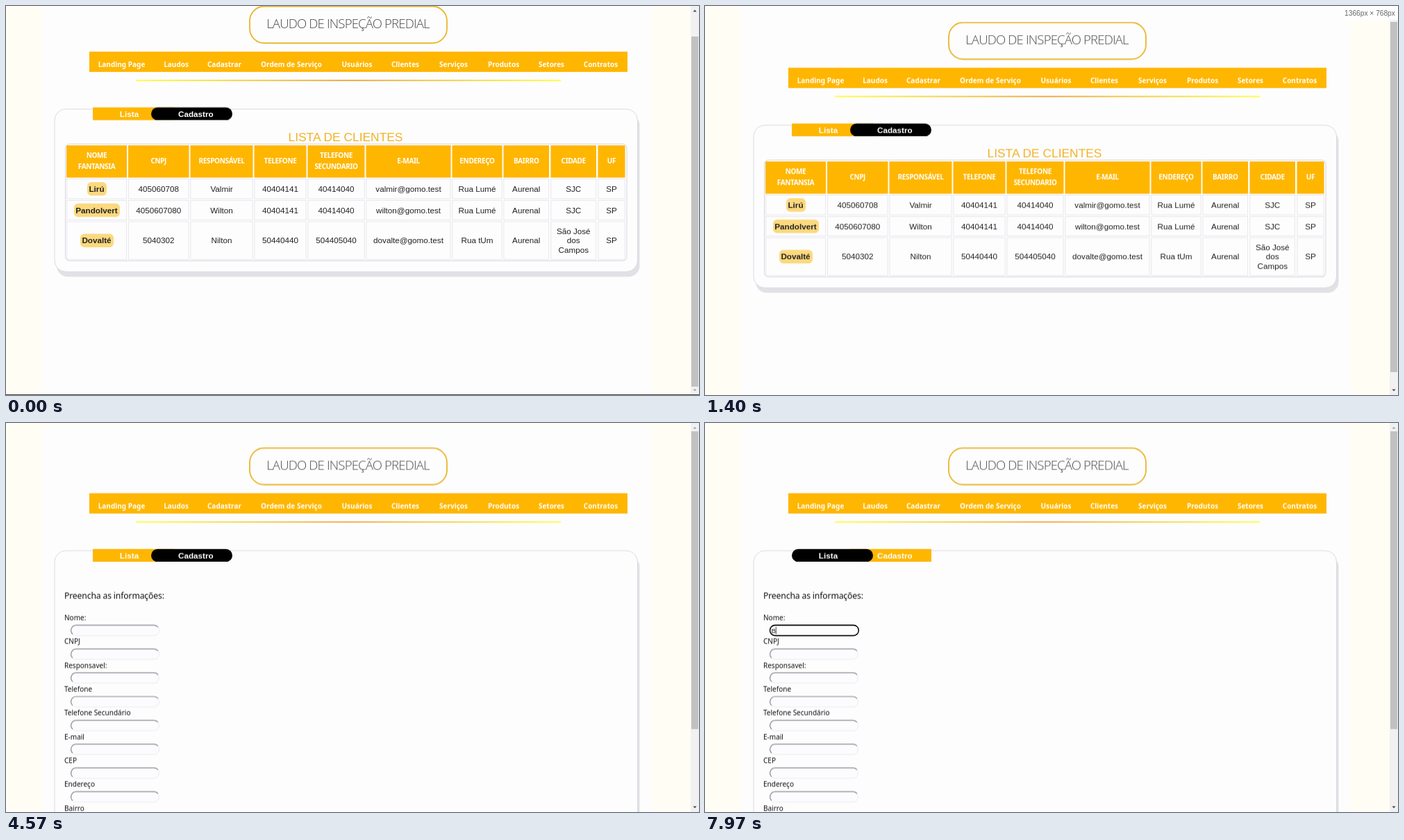
These frames come from a looping animation (998 by 561 pixels, 8000 ms). An HTML page:

```html
<!DOCTYPE html>
<html lang="pt">
<head>
<meta charset="utf-8">
<title>Lista de clientes</title>
<style>
  html, body { margin: 0; width: 100%; height: 100%; overflow: hidden; background: #fffdf4; }
  svg { display: block; width: 100%; height: 100%; }
  text { font: 11.7px "Liberation Sans", Arial, sans-serif; fill: #222; }
  .mid { text-anchor: middle; }
  .bold { font-weight: 700; }
  .white { fill: #fff; }
  .title { font: 300 18.6px "Open Sans", sans-serif; letter-spacing: -.85px; fill: #4c4c4c; }
  .nav { font: 600 10px "Noto Sans", sans-serif; fill: #fff; }
  .head { font: 600 10px "Noto Sans", sans-serif; letter-spacing: -.35px; fill: #fff; }
  .caption { font-size: 17.4px; fill: #f2b227; }
  .intro { font: 500 12.2px "Noto Sans", sans-serif; letter-spacing: -.15px; fill: #111; }
  .label { font: 500 10px "Noto Sans", sans-serif; fill: #111; }
  .typed { font-size: 9.8px; fill: #333; }
  .size { font-size: 10.2px; fill: #666; }
</style>
</head>
<body>
<svg id="stage" viewBox="0 0 998 561" preserveAspectRatio="none"></svg>
<script>
const LOOP = 8000;
const AMBER = '#ffb600', PAPER = '#fdfdfd', LINE = '#e3e3ec';
const stage = document.getElementById('stage');

function add(parent, tag, attrs = {}) {
  const el = document.createElementNS('http://www.w3.org/2000/svg', tag);
  for (const key in attrs) el.setAttribute(key, attrs[key]);
  parent.append(el);
  return el;
}
const group = parent => add(parent, 'g');
const rect = (parent, x, y, width, height, fill, more) =>
  add(parent, 'rect', { x, y, width, height, fill, ...more });
const path = (parent, d, fill, more) => add(parent, 'path', { d, fill, ...more });

// cy is the middle of the capital letters
function text(parent, str, x, cy, cls = 'mid') {
  const el = add(parent, 'text', { x, class: cls });
  el.textContent = str;
  el.setAttribute('y', cy + parseFloat(getComputedStyle(el).fontSize) * .36);
  return el;
}

// steps: [time in ms, value, easing]; values hold unless an easing is given
function play(el, prop, steps) {
  const frames = steps.map(([ms, value, easing = 'step-end']) =>
    ({ offset: ms / LOOP, [prop]: value, easing }));
  frames.push({ offset: 1, [prop]: steps[steps.length - 1][1] });
  el.animate(frames, { duration: LOOP, iterations: Infinity });
}
const show = (el, from, to = LOOP) => {
  const steps = from ? [[0, 0], [from, 1]] : [[0, 1]];
  if (to < LOOP) steps.push([to, 0]);
  play(el, 'opacity', steps);
};
const slide = (el, far, near) => play(el, 'transform', [
  [0, far], [1250, far, 'ease-out'], [1400, near], [1700, near, 'ease-out'], [1800, 0]
].map(([ms, y, easing]) => [ms, `translate(0px, ${y}px)`, easing]));

const FORM_AT = 4300, TAB_AT = 5100, FOCUS_AT = 5300, TYPE_AT = 7750;

// Page
const page = group(stage);
slide(page, -35.5, -12.3);
const listSheet = rect(page, 51, 5, 879, 586.5, PAPER);
const formSheet = rect(page, 51, 5, 879, 700, PAPER);
show(formSheet, FORM_AT);

rect(page, 351, 36, 284, 53, PAPER, { rx: 21, stroke: '#eab62f', 'stroke-width': 1.8 });
text(page, 'LAUDO DE INSPEÇÃO PREDIAL', 492.5, 61, 'mid title');

rect(page, 120, 101.3, 775, 29.3, AMBER);
[['Landing Page', 166.5], ['Laudos', 245], ['Cadastrar', 314.5], ['Ordem de Serviço', 411],
 ['Usuários', 505.5], ['Clientes', 575], ['Serviços', 644.5], ['Produtos', 716.5],
 ['Setores', 785.5], ['Contratos', 856.5]]
  .forEach(([name, x]) => text(page, name, x, 119.8, 'mid nav'));

const fade = add(add(page, 'defs'), 'linearGradient', { id: 'rule' });
[[0, '#ffff2a'], [.5, '#e99a2c'], [1, '#ffff2a']]
  .forEach(([offset, color]) => add(fade, 'stop', { offset, 'stop-color': color }));
rect(page, 187, 142, 612, 1.7, 'url(#rule)');

function panel(parent, height) {
  rect(parent, 73, 191.5, 839.5, height, '#e1e1e6', { rx: 16 });
  rect(parent, 70, 184.2, 839.5, height, PAPER, { rx: 16, stroke: '#d6d6e0', 'stroke-width': .9 });
}

// Client list
const list = group(page);
show(list, 0, FORM_AT);
panel(list, 234.5);
text(list, 'LISTA DE CLIENTES', 489, 224, 'mid caption');
rect(list, 85.5, 234.5, 808.5, 168.5, 'none', { rx: 6, stroke: '#d6d6e0' });

const columns = [
  [87, 174, 'NOME|FANTANSIA'], [176, 263.5, 'CNPJ'], [265.5, 355.5, 'RESPONSÁVEL'],
  [357.5, 432.5, 'TELEFONE'], [434.5, 516.5, 'TELEFONE|SECUNDARIO'], [518.5, 640.5, 'E-MAIL'],
  [642.5, 714.5, 'ENDEREÇO'], [716.5, 782, 'BAIRRO'], [784.5, 850, 'CIDADE'], [852.5, 891.5, 'UF']
];
const rows = [
  [285, 313.5, 'Lirú,405060708,Valmir,40404141,40414040,valmir@gomo.test,Rua Lumé,Aurenal,SJC,SP', 28],
  [315.8, 344.2, 'Pandolvert,4050607080,Wilton,40404141,40414040,wilton@gomo.test,Rua Lumé,Aurenal,SJC,SP', 66],
  [346.5, 401, 'Dovalté,5040302,Nilton,50440440,504405040,dovalte@gomo.test,Rua tUm,Aurenal,São José|dos|Campos,SP', 48]
];
function lines(parent, str, x, cy, gap, cls) {
  const parts = str.split('|');
  parts.forEach((part, i) => text(parent, part, x, cy + (i - (parts.length - 1) / 2) * gap, cls));
}
columns.forEach(([left, right, name], c) => {
  const mid = (left + right) / 2;
  rect(list, left, 236.5, right - left, 46.5, AMBER);
  lines(list, name, mid, 259, 15.4, 'mid head');
  rows.forEach(([top, bottom, cells, badge]) => {
    const cy = (top + bottom) / 2;
    rect(list, left + .4, top, right - left - .8, bottom - top, 'none', { stroke: LINE, 'stroke-width': .8 });
    if (!c) rect(list, mid - badge / 2 + .5, cy - 9.7, badge, 19.4, '#fcd97f', { rx: 6 });
    lines(list, cells.split(',')[c], mid, cy, 13.4, c ? 'mid' : 'mid bold');
  });
});

// Registration form
const form = group(page);
show(form, FORM_AT);
panel(form, 480);
text(form, 'Preencha as informações:', 84, 248.8, 'intro');
['Nome:', 'CNPJ', 'Responsavel:', 'Telefone', 'Telefone Secundário', 'E-mail', 'CEP', 'Endereço', 'Bairro']
  .forEach((name, i) => {
    const y = 281 + i * 34.3;
    text(form, name, 84, y, 'label');
    rect(form, 93.5, y + 10.6, 127, 15, '#fcfcff', { rx: 7.5, stroke: '#ececf2' });
    path(form, `M96 ${y + 23.5}A7.5 7.5 0 0 1 101 ${y + 10.6}H213A7.5 7.5 0 0 1 219 ${y + 13.4}`,
      'none', { stroke: '#8b8b92', 'stroke-width': 1.2 });
  });

const focus = group(page);
show(focus, FOCUS_AT);
rect(focus, 93.5, 291.6, 127.8, 15, PAPER, { rx: 7.5, stroke: '#111', 'stroke-width': 1.6 });
show(text(focus, 'B', 95.5, 299.2, 'typed'), TYPE_AT);
const caret = rect(focus, 95.6, 294, .9, 10.5, '#222');
play(caret, 'opacity', [0, 500, 1000, 1500, 2000].reduce(
  (steps, ms, i) => [...steps, [FOCUS_AT + ms, (i + 1) % 2]], [[0, 0]]));
play(caret, 'transform', [[0, 'translate(0px, 0px)'], [TYPE_AT, 'translate(6.3px, 0px)']]);
// Tabs
const tab = (parent, x, dark) =>
  rect(parent, x, 181.7, 117, 18.4, dark ? '#000' : AMBER, dark ? { rx: 9.2 } : {});
const darkRight = group(page), darkLeft = group(page);
tab(darkRight, 125, false);
tab(darkRight, 209, true);
tab(darkLeft, 209, false);
tab(darkLeft, 125, true);
show(darkRight, 0, TAB_AT);
show(darkLeft, TAB_AT);
text(page, 'Lista', 177.5, 191, 'mid bold white');
text(page, 'Cadastro', 273.3, 191, 'mid bold white');

// Scrollbar
rect(stage, 986, 0, 12, 561, '#f1f1f1');
const longThumb = group(stage);
slide(rect(longThumb, 987, 12, 10, 505, '#c1c1c1'), 32, 11);
show(longThumb, 0, FORM_AT);
show(rect(stage, 987, 12, 10, 429.5, '#c1c1c1'), FORM_AT);
const UP = 'M989.5 8.3L992 5.5L994.5 8.3Z', DOWN = 'M989.5 552.7L992 555.5L994.5 552.7Z';
path(stage, UP, '#a3a3a3');
path(stage, DOWN, '#a3a3a3');
show(path(stage, UP, '#505050'), 0, 1800);
show(path(stage, DOWN, '#505050'), 1250);

// Window edge and viewport size hint
show(rect(stage, 0, 560, 998, 1, '#444'), 0, 1000);
const hint = group(stage);
rect(hint, 915, 0, 83, 20, '#fefefe');
text(hint, '1366px × 768px', 957.5, 10, 'mid size');
show(hint, 1000, 2100);
</script>
</body>
</html>
```
